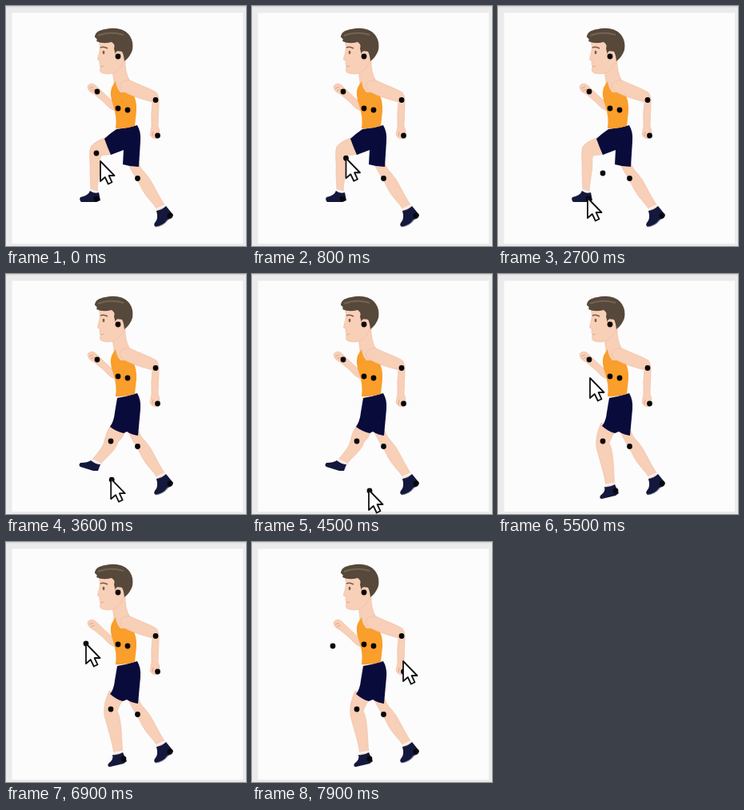
These frames come from a looping animation (300x300 px, 8000 ms). An HTML page:

```html
<!DOCTYPE html>
<html lang="en">
<head>
<meta charset="utf-8">
<title>Puppet pins</title>
<style>
html, body { margin: 0; width: 100%; height: 100%; overflow: hidden; background: #ebebeb; }
svg { display: block; width: 100vw; height: 100vh; }
.skin { fill: #f8cfb7; stroke: #efbda3; stroke-width: .6; }
.navy { fill: #090b3b; }
.shoe { fill: #14183d; }
.sock { fill: none; stroke: #f4f2f4; stroke-width: 2.4; }
.line { fill: none; stroke: #dda68c; stroke-width: 1; }
#runner { filter: blur(.45px); }
</style>
</head>
<body>
<svg viewBox="0 0 300 300">
  <rect width="300" height="1.3" fill="#d6d6d6"/>
  <rect x="7.5" y="8.5" width="288.5" height="288.5" fill="#fcfcfc"/>
  <g id="runner">
    <!-- rear leg -->
    <path class="skin" d="M152 196L166 196C168 205 176 209 182 220C188 231 193 241 199 250L190 256C184 246 176 240 170 229C166 220 160 212 152 196Z"/>
    <path class="sock" d="M188.5 254L199 249"/>
    <path class="shoe" d="M188 256Q195 255 200 250L209 261Q208 266 202 267Q196 275 187 276Q184 274 186 271Q191 266 188 256Z"/>
    <path d="M187 276Q197 275 203 267" fill="none" stroke="#6d7088" stroke-width=".8"/>

    <!-- front leg: start, knee moved, foot moved -->
    <g class="leg">
      <path class="skin" d="M128 163C118 167 110 170 106 176C103 184 106 197 105 208L106 231L114 234C114 221 118 208 118 196Q117 190 119 187L134 185Z"/>
      <path class="sock" d="M105 230L115 233"/>
      <path class="shoe" d="M105 231Q110 235 116 233L118 243L113 245H94Q91 242 93 239Q103 237 105 231Z"/>
      <path class="navy" d="M138 154Q151 153 164 149Q169 157 168 169L166 201Q156 201 146 198L147 180L131 186Q127 177 123 166Q129 160 138 154Z"/>
    </g>
    <g class="leg">
      <path class="skin" d="M132 188L149 197Q145 206 140 210C137 221 126 228 118 238L107 233C115 223 121 217 123 209Q125 197 132 188Z"/>
      <path class="sock" d="M107 232L118 237"/>
      <path class="shoe" d="M106 233Q112 238 118 238L115 246L109 246L93 241Q90 239 93 236Q102 236 106 233Z"/>
      <path class="navy" d="M139 155Q151 153 164 149Q169 157 168 169L165 202Q157 201 151 197L147 199Q138 197 130 191Q135 184 136 173Z"/>
    </g>
    <g class="leg">
      <path class="skin" d="M129 186L147 195Q142 204 139 211C145 223 144 244 146 264L135 266C133 249 127 233 123 217Q121 203 129 186Z"/>
      <path class="sock" d="M134 264L146 262"/>
      <path class="shoe" d="M133 266Q140 267 146 263L151 274L147 277L130 281Q126 281 128 277Q135 272 133 266Z"/>
      <path class="navy" d="M139 155Q151 153 164 149Q169 157 168 169L165 202Q157 201 151 197L146 199Q138 197 130 190Q135 184 136 173Z"/>
    </g>

    <!-- far arm, neck and torso -->
    <path class="skin" d="M117 104L133 119L138 132Q129 129 122 120L110 110Q102 107 102 100Q107 94 113 100Z"/>
    <path class="line" d="M104 103L109 101M106 106L111 104"/>
    <path class="skin" d="M133 80L149 64Q148 82 155 94L161 111L134 113Q132 104 135 96Z"/>
    <path d="M137 94Q138 103 143 108L158 108Q164 118 163 132L161 150Q149 154 137 153Q139 139 134 124Q129 111 132 102Z" fill="#fa9e2c"/>

    <!-- near arm -->
    <path class="skin" d="M143 97Q149 91 155 93C167 99 178 102 188 108Q192 114 191 123L190 150Q194 158 190 165Q184 168 180 161L182 150Q181 135 183 120C172 117 158 113 147 107Q141 103 143 97Z"/>
    <path class="line" d="M184 157L183 163"/>

    <!-- head -->
    <path class="skin" d="M116 43Q118 50 117 56L114.500 66Q114 68 117 68L117 72L118 77Q116 83 121 84Q129 86 134 84Q144 80 149 65L146 43Z"/>
    <path d="M111 39Q111 31 124 29Q143 25 153 35Q160 43 158 55Q155 64 148 69Q147 60 145 57Q138 55 137 62L135 53Q137 48 132 45Q121 48 113 44Q115 41 111 39Z" fill="#56483a"/>
    <path d="M115 37Q130 31 147 36" fill="none" stroke="#746452" stroke-width="2"/>
    <ellipse cx="140" cy="62" rx="3.700" ry="5.500" class="skin"/>
    <path d="M118 52Q122 50 127 53" fill="none" stroke="#7c5b46" stroke-width="1.500"/>
    <ellipse cx="122" cy="58" rx="1.400" ry="2.200" fill="#796052"/>
    <path class="line" d="M118 76L122 75"/>
  </g>
  <g id="pins" fill="#080808"></g>
  <path id="cursor" d="M0 0V25L5.800 20L9.800 28.500L14.500 26.300L10.600 18H17.500Z" fill="#fff" stroke="#111" stroke-width="1.800" stroke-linejoin="round"/>
</svg>
<script>
const LOOP = 8000;
const KNEE_SET = 2800, FOOT_SET = 4700;
const $ = id => document.getElementById(id);
const legs = document.querySelectorAll('.leg');

// Each key is [time, x, y].
const cursorKeys = [
  [0, 118, 194], [400, 113, 184], [600, 113, 184], [1400, 131, 209], [1600, 131, 209],
  [1700, 123, 212], [2000, 114, 235], [2300, 112, 240], [2700, 112, 240],
  [4200, 144, 267], [4500, 146, 270], [4700, 146, 270], [5500, 115, 130],
  [5800, 114, 107], [6000, 114, 107], [6700, 100, 127], [6900, 100, 127],
  [7100, 101, 130], [7900, 189, 149], [8000, 189, 153]
];
const kneeKeys = [[600, 113, 184], [1400, 131, 209]];
const footKeys = [[2700, 113, 241], [4200, 145, 268], [4500, 147, 271]];
const handKeys = [[6000, 114, 107], [6700, 100, 127], [6900, 100, 127], [7100, 101, 130]];

function addPin(x, y) {
  const pin = document.createElementNS('http://www.w3.org/2000/svg', 'circle');
  pin.setAttribute('r', 3.4);
  place(pin, [x, y]);
  return $('pins').appendChild(pin);
}

function place(node, [x, y]) {
  node.setAttribute('transform', `translate(${x} ${y})`);
}

function at(keys, t) {
  const next = keys.findIndex(k => k[0] > t);
  if (next === 0) return keys[0].slice(1);
  if (next < 0) return keys[keys.length - 1].slice(1);
  const [t0, x0, y0] = keys[next - 1], [t1, x1, y1] = keys[next];
  const p = (t - t0) / (t1 - t0);
  return [x0 + (x1 - x0) * p, y0 + (y1 - y0) * p];
}

[[140, 63], [140, 128], [152, 130], [187, 117.5], [189.5, 162], [164.5, 215.5], [205, 262]]
  .forEach(([x, y]) => addPin(x, y));
const dragged = [kneeKeys, footKeys, handKeys].map(keys => [addPin(0, 0), keys]);

function draw(now) {
  const t = Math.floor(now % LOOP / 100) * 100;
  const pose = t < KNEE_SET ? 0 : t < FOOT_SET ? 1 : 2;
  legs.forEach((leg, i) => leg.style.display = i === pose ? '' : 'none');
  dragged.forEach(([pin, keys]) => place(pin, at(keys, t)));
  place($('cursor'), at(cursorKeys, t));
  requestAnimationFrame(draw);
}
draw(0);
</script>
</body>
</html>
```
